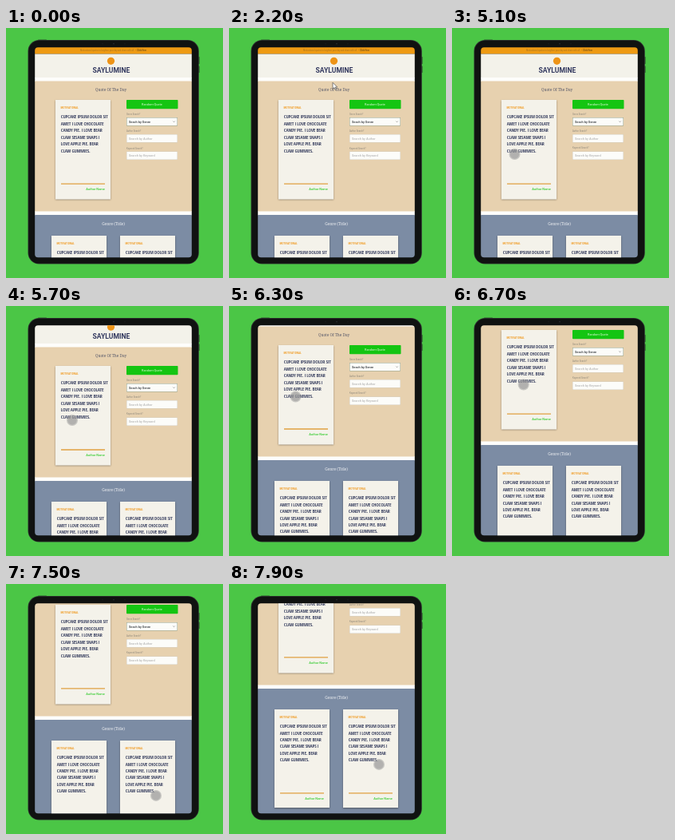
Write an HTML page with a canvas that moves like this. It is 272 by 313 pixels and loops after 8 s.

```html
<!DOCTYPE html>
<html lang="en">
<head>
<meta charset="utf-8">
<title>Quote page on a tablet</title>
<style>
html, body { margin: 0; width: 100%; height: 100%; overflow: hidden; background: #4bc646; }
canvas { display: block; width: 272px; height: 313px; }
</style>
</head>
<body>
<canvas id="stage"></canvas>
<script>
const W = 272, H = 313, LOOP = 8000;
const canvas = document.getElementById('stage');
const ctx = canvas.getContext('2d');
const dpr = window.devicePixelRatio || 1;
canvas.width = W * dpr;
canvas.height = H * dpr;

const SANS = 'Roboto, sans-serif';
const SLAB = '"Roboto Slab", "Noto Serif", serif';
const NARROW = '"Noto Sans ExtraCondensed", "Noto Sans Condensed", "Open Sans Condensed", '
  + '"Roboto Condensed", "Noto Sans", sans-serif';
const QUOTE = ['CUPCAKE IPSUM DOLOR SIT', 'AMET I LOVE CHOCOLATE', 'CANDY PIE. I LOVE BEAR',
  'CLAW SESAME SNAPS I', 'LOVE APPLE PIE. BEAR', 'CLAW GUMMIES.'];

// keys: [time, value, ...]
const SCROLL = [[5100, 0], [5700, 15], [6300, 41], [6700, 60], [7100, 61], [7400, 61], [7900, 103], [8000, 111]];
const TOUCH = [[3000, -3, 67], [4000, 58, 95], [4700, 78.5, 158], [5100, 78.5, 158], [5700, 83, 143],
  [6300, 83.5, 113.5], [6650, 86, 96], [7100, 180.5, 200], [7400, 188, 268], [7900, 188, 226], [8000, 188, 218]];

// Monotone cubic through the keys of one column.
function track(keys, t, col = 1) {
  const n = keys.length - 1;
  if (t <= keys[0][0]) return keys[0][col];
  if (t >= keys[n][0]) return keys[n][col];
  let i = 0;
  while (t >= keys[i + 1][0]) i++;
  const slope = k => (keys[k + 1][col] - keys[k][col]) / (keys[k + 1][0] - keys[k][0]);
  const tangent = k => {
    if (k === 0 || k === n) return slope(Math.min(k, n - 1));
    const a = slope(k - 1), b = slope(k);
    return a * b <= 0 ? 0 : 2 * a * b / (a + b);
  };
  const h = keys[i + 1][0] - keys[i][0], u = (t - keys[i][0]) / h, v = 1 - u;
  return keys[i][col] * (1 + 2 * u) * v * v + tangent(i) * h * u * v * v
    + keys[i + 1][col] * u * u * (3 - 2 * u) - tangent(i + 1) * h * u * u * v;
}

function box(x, y, w, h, color, r = 0) {
  ctx.fillStyle = color;
  ctx.beginPath();
  ctx.roundRect(x, y, w, h, r);
  ctx.fill();
}

function disc(x, y, r, color) {
  ctx.fillStyle = color;
  ctx.beginPath();
  ctx.arc(x, y, r, 0, 7);
  ctx.fill();
}

function setFont(size, family, weight, stretch, spacing) {
  ctx.font = `${weight} ${size}px ${family}`;
  ctx.fontStretch = stretch;
  ctx.letterSpacing = `${spacing * size}px`;
}

// y is the baseline
function text(str, x, y, size, color,
    { family = SANS, weight = 400, align = 'left', stretch = 'normal', spacing = 0 } = {}) {
  setFont(size, family, weight, stretch, spacing);
  ctx.textAlign = align;
  ctx.fillStyle = color;
  ctx.fillText(str, x, y);
}

// Quote type: as large as the card's column allows.
const quoteType = { family: NARROW, weight: 500, stretch: 'extra-condensed', spacing: -.03 };
setFont(100, NARROW, 500, quoteType.stretch, quoteType.spacing);
const quoteSize = Math.min(7.2, 100 * 59 / ctx.measureText(QUOTE[0]).width);

function shadow(color, blur, dy) {
  ctx.shadowColor = color;
  ctx.shadowBlur = blur * dpr;
  ctx.shadowOffsetY = dy * dpr;
}

function card(x, y, h, pitch) {
  shadow('rgba(40,35,30,.5)', 2, .8);
  box(x, y, 69, h, '#f4f2ea');
  shadow('transparent', 0, 0);
  text('MOTIVATIONAL', x + 6.5, y + 11, 3.1, '#f0a030', { weight: 600 });
  QUOTE.forEach((line, i) => text(line, x + 6.8, y + 21.2 + quoteSize * .36 + i * pitch,
    quoteSize, '#424967', quoteType));
  box(x + 7, y + 104.4, 55, 1.3, '#e0a040');
  text('Author Name', x + 62, y + 113, 4, '#35cc30', { align: 'right', weight: 500 });
}

function field(label, hint, y, select) {
  text(label, 151, y - 3, 2.7, '#8d877c');
  box(151, y, 64, 10.5, select ? '#8fa08a' : '#d5cfc2', .6);
  box(151.5, y + .5, 63, 9.5, '#fcfcf9', .4);
  text(hint, 154, y + 6.8, 3.9, select ? '#30343a' : '#a5a5a5', { weight: select ? 500 : 400 });
  if (!select) return;
  ctx.strokeStyle = '#555';
  ctx.lineWidth = .5;
  ctx.beginPath();
  ctx.moveTo(209.3, y + 4.6);
  ctx.lineTo(210.5, y + 5.8);
  ctx.lineTo(211.7, y + 4.6);
  ctx.stroke();
}

function page() {
  box(36, 24, 198, 8.5, '#ee9a13');
  text('Motivational quotes to brighten your day and share with all', 93, 29.3, 2.6, '#a9741f');
  text('-  Click Here', 176, 29.3, 2.6, '#6a4a18', { align: 'right', weight: 500 });
  box(36, 32.5, 198, 30, '#f3f2ea');
  box(36, 62, 198, 5, '#fdfdfb');
  disc(131.5, 41.3, 4.6, '#ee9416');
  text('SAYLUMINE', 132, 56, 8.6, '#343a60', { align: 'center', weight: 700 });

  box(36, 66.5, 198, 163.5, '#e7d1af');
  text('Quote Of The Day', 131.5, 79.2, 4.7, '#56586a', { family: SLAB, align: 'center' });
  card(62, 90, 124.5, 8.5);
  box(151, 90, 64.5, 11.3, '#14c512', .8);
  text('Random Quote', 183, 97.2, 3.9, '#e4fbe0', { align: 'center' });
  field('Genre Search?', 'Seach by Genre', 112, true);
  field('Author Search?', 'Search by Author', 133, false);
  field('Keyword Search?', 'Search by Keyword', 154.5, false);

  box(36, 229.5, 198, 5, '#fdfdfb');
  box(36, 234, 198, 200, '#7c8ca4');
  text('Genre (Title)', 134.5, 247.1, 4.8, '#f2f3f5', { family: SLAB, align: 'center' });
  card(57, 260, 123, 8.4);
  card(143, 260, 123, 8.4);
}

function tablet() {
  box(241, 36, 1.6, 9, '#2c5a2c', .6);
  box(241, 47.5, 1.6, 8.5, '#2c5a2c', .6);
  box(40, 14.5, 11, 1, '#2c5a2c', .4);
  box(27.5, 15, 214.3, 280.6, '#2e3430', 14);
  box(28.3, 15.8, 212.7, 279, '#101211', 13.3);
  disc(135, 19.7, .8, '#2d3436');
  disc(121, 19.7, .5, '#262b2c');
  disc(149, 19.7, .5, '#262b2c');
}

function arrow(x, y) {
  ctx.beginPath();
  [[0, 0], [0, 8], [1.9, 6.3], [3.2, 9.2], [4.5, 8.6], [3.2, 5.8], [5.7, 5.7]]
    .forEach(([dx, dy]) => ctx.lineTo(x + dx, y + dy));
  ctx.closePath();
  ctx.fillStyle = '#fff';
  ctx.strokeStyle = '#4a4a4a';
  ctx.lineWidth = .7;
  ctx.fill();
  ctx.stroke();
}

function touch(x, y) {
  disc(x, y, 7, 'rgba(155,155,155,.5)');
  disc(x, y, 5.7, 'rgba(145,145,145,.4)');
}

function draw(t) {
  ctx.setTransform(dpr, 0, 0, dpr, 0, 0);
  box(0, 0, W, H, '#4bc646');
  tablet();
  ctx.save();
  ctx.beginPath();
  ctx.roundRect(36.2, 24.2, 196.6, 263, 4);
  ctx.clip();
  ctx.translate(0, -track(SCROLL, t));
  page();
  ctx.restore();
  if (t >= 2200 && t < 3000) arrow(t < 2700 ? 130 : 129.5, 68.3);
  if (t >= 3000) touch(track(TOUCH, t, 1), track(TOUCH, t, 2));
}

const start = performance.now();
function tick() {
  draw((performance.now() - start) % LOOP);
  requestAnimationFrame(tick);
}
tick();
</script>
</body>
</html>
```
